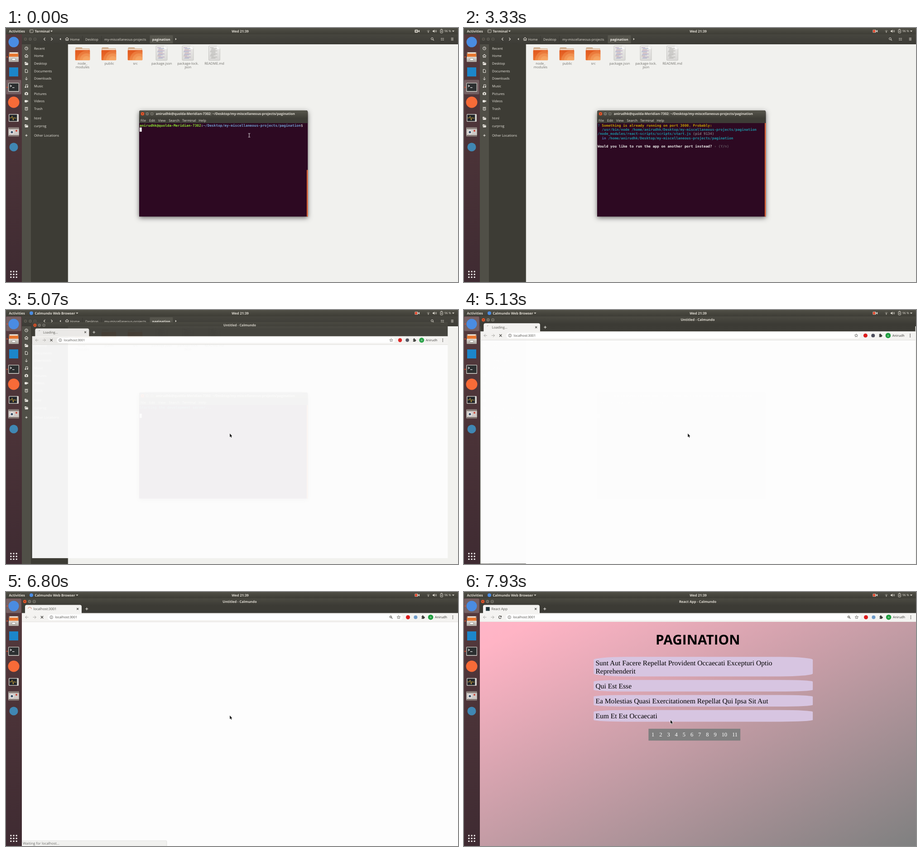
An HTML page with a canvas that plays this animation: 998x561 px, repeating every 8 s.

```html
<!DOCTYPE html>
<html lang="en">
<head>
<meta charset="utf-8">
<title>Pagination demo</title>
<style>
html, body { margin: 0; width: 100%; height: 100%; overflow: hidden; background: #f1f1ee; }
canvas { display: block; width: 998px; height: 561px; }
</style>
</head>
<body>
<canvas id="stage" width="998" height="561"></canvas>
<script>
const c = document.getElementById('stage').getContext('2d');
const LOOP = 8000, STEP = 1000 / 15, TAU = Math.PI * 2;
const SANS = '"Open Sans", "Noto Sans", sans-serif';
const SERIF = '"Liberation Serif", serif';
const MONO = '"DejaVu Sans Mono", monospace';
const USER = 'anirudhk', HOST = 'quolda-Meridian-7302', BROWSER = 'Calmundo';
const DIR = 'Desktop/my-miscellaneous-projects/pagination';
const LIGHT = '#dfdbd2';

// ---- drawing helpers ----
function rect(x, y, w, h, fill) { c.fillStyle = fill; c.fillRect(x, y, w, h); }
function box(x, y, w, h, r, fill, stroke, lw = 0.7) {
  c.beginPath(); c.roundRect(x, y, w, h, r);
  if (fill) { c.fillStyle = fill; c.fill(); }
  if (stroke) { c.strokeStyle = stroke; c.lineWidth = lw; c.stroke(); }
}
function disc(x, y, r, fill) { c.beginPath(); c.arc(x, y, r, 0, TAU); c.fillStyle = fill; c.fill(); }
function arc(x, y, r, a, b, color, lw = 1) {
  c.beginPath(); c.arc(x, y, r, a, b);
  c.strokeStyle = color; c.lineWidth = lw; c.stroke();
}
function trace(x, y, pts) {
  c.beginPath();
  for (let i = 0; i < pts.length; i += 2) c.lineTo(x + pts[i], y + pts[i + 1]);
}
function line(x, y, pts, color, lw = 1) { trace(x, y, pts); c.strokeStyle = color; c.lineWidth = lw; c.stroke(); }
function poly(x, y, pts, color) { trace(x, y, pts); c.closePath(); c.fillStyle = color; c.fill(); }
function fade(y0, y1, a, b) {
  const g = c.createLinearGradient(0, y0, 0, y1);
  g.addColorStop(0, a); g.addColorStop(1, b);
  return g;
}
// y is the middle of the capitals
function text(s, x, y, size, color, { bold, align = 'left', family = SANS } = {}) {
  c.font = `${bold ? 700 : 400} ${size}px ${family}`;
  c.textAlign = align; c.fillStyle = color;
  c.fillText(s, x, y + size * 0.357);
}
function cross(x, y, r, color, lw) {
  line(x, y, [-r, -r, r, r], color, lw);
  line(x, y, [-r, r, r, -r], color, lw);
}
function plus(x, y, r, color, lw) {
  line(x, y, [-r, 0, r, 0], color, lw);
  line(x, y, [0, -r, 0, r], color, lw);
}
function caret(x, y, color) { poly(x, y, [-2.6, -1.3, 2.6, -1.3, 0, 1.6], color); }
function lens(x, y, color) {
  arc(x - 0.6, y - 0.6, 2.3, 0, TAU, color, 1);
  line(x, y, [1, 1, 3.4, 3.4], color, 1.2);
}
function house(x, y, color) {
  line(x, y, [-4, 0.3, 0, -3.4, 4, 0.3], color, 1.1);
  line(x, y, [-2.7, 0, -2.7, 3.3, -0.8, 3.3, -0.8, 1, 0.8, 1, 0.8, 3.3, 2.7, 3.3, 2.7, 0], color, 1);
}
function winButtons(x, y, gap, active) {
  for (let i = 0; i < 3; i++) {
    const bx = x + gap * i;
    disc(bx, y, 4.3, '#33322d');
    disc(bx, y, 3.8, !active ? '#5a5951' : i ? '#77756b' : '#e9582c');
    if (i == 0) cross(bx, y, 1.4, '#3b2a22', 0.8);
    if (i == 1) line(bx, y, [-1.6, 0, 1.6, 0], '#33322d', 0.8);
    if (i == 2) box(bx - 1.4, y - 1.4, 2.8, 2.8, 0, null, '#33322d');
  }
}

// ---- shell ----
function topBar(t, web) {
  rect(0, 0, 998, 14, fade(0, 14, '#504f46', '#3e3d36'));
  text('Activities', 6.5, 7, 7.6, LIGHT, { bold: true });
  if (web) {
    disc(56, 7, 4, '#4a8ce2');
    text(BROWSER + ' Web Browser', 63.5, 7, 7.5, LIGHT, { bold: true });
    caret(157, 7, LIGHT);
  } else {
    box(52.5, 3.8, 7.5, 6.4, 1, null, LIGHT, 0.8);
    line(54, 5.4, [0, 0, 1.3, 1.2, 0, 2.4], LIGHT, 0.7);
    text('Terminal', 63.5, 7, 7.5, LIGHT, { bold: true });
    caret(100.5, 7, LIGHT);
  }
  text('Wed 21:39', 517, 7, 7.5, LIGHT, { bold: true, align: 'center' });
  box(902.5, 3.7, 7, 6.6, 1, LIGHT);
  poly(909.5, 7, [0, 0, 3.6, -2.8, 3.6, 2.8], LIGHT);
  if (t >= 70) box(903, 4.2, 5, 5.6, 1, '#e2492f');
  else disc(906, 7, 1.8, '#56554c');
  for (const r of [2.2, 4.3]) arc(932.5, 9.3, r, -2.4, -0.74, r > 3 ? '#8b897f' : LIGHT, 1);
  disc(932.5, 9.4, 0.9, LIGHT);
  poly(943, 7, [-1, -1.3, 1, -1.3, 3.2, -3.5, 3.2, 3.5, 1, 1.3, -1, 1.3], LIGHT);
  for (const r of [2, 3.8]) arc(946.5, 7, r, -0.8, 0.8, LIGHT, 0.9);
  box(959, 3.6, 5.4, 7.4, 1, null, LIGHT, 0.9);
  rect(960.4, 2.4, 2.6, 1.2, LIGHT);
  poly(961.7, 7.3, [0.8, -2.5, -1.5, 0.5, 0, 0.5, -0.8, 2.6, 1.5, -0.5, 0, -0.5], LIGHT);
  text('96 %', 968, 7, 6.6, LIGHT);
  caret(987.5, 7, LIGHT);
}
function dock(web) {
  rect(0, 14, 35, 547, fade(14, 561, '#553a3d', '#3f2b32'));
  box(0.5, web ? 14.5 : 114.5, 33, 32, 2, 'rgba(255,255,255,.2)');
  for (const y of web ? [31, 64, 131] : [64, 131]) disc(2.6, y, 1.3, '#e9582c');
  disc(17, 31, 11.5, '#4a8ce2');
  // file cabinet
  box(6, 53, 22, 22, 1.5, '#8b7464');
  rect(8, 54, 18, 5, '#f0eee9');
  rect(7, 56.5, 20, 8, '#e8762f');
  box(6, 63.5, 22, 11.5, 1, fade(63, 75, '#e2dfda', '#aaa59e'));
  box(13, 67, 8, 4.5, 1, '#f8f8f6', '#7d7872');
  box(7, 87, 20, 20, 0, '#1c86ca');
  // terminal
  box(5, 121, 24, 20, 1.5, '#c9c7c1');
  rect(6.3, 122.3, 21.4, 17, '#2c2f30');
  line(9, 126, [0, 0, 3, 2, 0, 4], '#fff', 1.2);
  rect(14, 131, 4.5, 1.2, '#fff');
  disc(17, 164, 12.5, '#f76b38');
  // system monitor
  box(6, 190, 22, 17, 1.5, '#d5d3ce');
  rect(7.3, 191.3, 17, 14.4, '#24272b');
  line(8, 198.5, [0, 0, 4, 0, 5.5, -4, 8, 5, 9.5, -1, 11, 0.5, 15, 0.5], '#dfb23c', 0.9);
  // screen recorder
  box(5, 219.5, 24, 20, 1, '#a8a19d');
  for (let x = 6.5; x < 28; x += 3) { rect(x, 220.5, 1.7, 1.8, '#57443f'); rect(x, 237, 1.7, 1.8, '#57443f'); }
  rect(6, 223.5, 22, 12.5, '#cfc9c6');
  disc(13, 230, 4.5, '#eeeceb'); disc(13, 230, 2.6, '#3d526a');
  disc(23, 227, 2, '#cc4436');
  disc(17, 263, 9.5, '#4087b3');
  for (let i = 0; i < 9; i++) disc(10.8 + (i % 3) * 6.2, 538 + (i / 3 | 0) * 6.2, 1.7, '#f4f1f0');
}

// ---- file manager ----
const sideIcons = {
  Recent(x, y, k) { arc(x, y, 3.3, 0, TAU, k, 1); line(x, y, [0, -2, 0, 0, 1.5, 0], k, 0.8); },
  Home: house,
  Documents(x, y, k) { line(x, y, [-2.6, -3.5, 1, -3.5, 2.7, -1.6, 2.7, 3.5, -2.6, 3.5, -2.6, -3.9], k, 1); },
  Downloads(x, y, k) { line(x, y, [0, -3.5, 0, 3], k, 1); line(x, y, [-2.8, 0.4, 0, 3.2, 2.8, 0.4], k, 1); },
  Music(x, y, k) { line(x, y, [-1.4, 2.4, -1.4, -3, 3, -3, 3, 1.6], k, 1); disc(-2 + x, y + 2.3, 1.5, k); disc(x + 2.3, y + 1.7, 1.5, k); },
  Pictures(x, y, k) { box(x - 3.7, y - 2.4, 7.4, 5.6, 1, k); rect(x - 1.4, y - 3.4, 2.8, 1.2, k); disc(x, y + 0.4, 1.5, '#504f47'); },
  Videos(x, y, k) { box(x - 3.8, y - 2.4, 5.4, 5, 0.8, k); poly(x, y, [1, 0, 3.8, -2.3, 3.8, 2.3], k); },
  Trash(x, y, k) { box(x - 2.8, y - 2, 5.6, 5.5, 1, null, k, 1); rect(x - 3.7, y - 3.6, 7.4, 1, k); line(x, y, [-0.8, -0.5, -0.8, 2.2], k, 0.7); line(x, y, [1, -0.5, 1, 2.2], k, 0.7); },
  'Other Locations'(x, y, k) { plus(x, y, 2.5, k, 1.1); }
};
function smallFolder(x, y, k) {
  poly(x, y, [-3.7, -3.2, -0.6, -3.2, 0.3, -2, 3.2, -2, 3.2, -1, -2.4, -1, -3.7, 3], k);
  poly(x, y, [-2, -0.3, 4.2, -0.3, 3.4, 3.4, -3.4, 3.4], k);
}
function bigFolder(cx) {
  box(cx - 15.5, 43, 15, 8, 1.5, '#c9a27f');
  box(cx - 15.5, 45, 31, 8, 1, '#d9b594');
  rect(cx - 14.5, 46.5, 29, 3, '#f6efe6');
  c.save();
  c.beginPath(); c.roundRect(cx - 16.3, 48.5, 32.6, 22.7, 1.5); c.clip();
  rect(cx - 17, 48, 34, 24, fade(48, 72, '#e0561c', '#ec7430'));
  for (const r of [21, 15, 9]) disc(cx + 9, 71, r, 'rgba(255,205,140,.24)');
  rect(cx - 17, 48.5, 34, 0.9, '#f4a06c');
  c.restore();
}
function docIcon(cx, inks) {
  box(cx - 12.5, 39.5, 25, 32, 1.5, fade(39, 72, '#ecebe9', '#d9d8d6'), '#bbbab7');
  for (let i = 0; i < 11; i++)
    rect(cx - 9.5 + i * 7 % 4, 43 + i * 2.3, 8 + i * 5 % 8, 0.9, inks[i % inks.length]);
  poly(cx + 12.5, 39.5, [-7, 0, 0, 7, -7, 7], '#fafaf9');
  poly(cx + 12.5, 39.2, [-6.6, 0, 0.4, 0, 0.4, 6.6], '#f1f1ee');
}
function files() {
  rect(35, 14, 963, 547, '#f1f1ee');
  rect(35, 14, 963, 22, fade(14, 36, '#47463f', '#3c3b35'));
  winButtons(43, 24.5, 10.5, false);
  line(85, 24.5, [1.5, -3, -1.5, 0, 1.5, 3], LIGHT, 1.1);
  line(101, 24.5, [-1.5, -3, 1.5, 0, -1.5, 3], LIGHT, 1.1);
  poly(120, 24.5, [1.2, -2.5, 1.2, 2.5, -1.6, 0], LIGHT);
  house(134.8, 24.3, LIGHT);
  box(317.5, 16, 51, 18, 1, '#55544c');
  for (const x of [168.5, 210.5]) rect(x, 17, 0.7, 16, '#37362f');
  text('Home', 141.5, 25, 7.45, LIGHT);
  text('Desktop', 175, 25, 7.45, LIGHT);
  text('my-miscellaneous-projects', 217, 25, 7.45, LIGHT);
  text('pagination', 342.7, 25, 7.4, '#f2efe8', { bold: true, align: 'center' });
  poly(375, 24.5, [-1.2, -2.5, -1.2, 2.5, 1.6, 0], LIGHT);
  lens(941.5, 24.3, LIGHT);
  for (const y of [22.8, 26.2]) { rect(960.5, y - 0.6, 1.8, 1.6, LIGHT); rect(963.2, y - 0.3, 3.8, 1, LIGHT); }
  for (const y of [22, 24.4, 26.8]) rect(982.7, y - 0.4, 5.2, 1, LIGHT);

  rect(35, 36, 102, 525, '#3d3c35');
  rect(35, 36, 20, 525, '#504f47');
  rect(136.3, 36, 0.8, 525, '#6f6e67');
  const names = ['Recent', 'Home', 'Desktop', 'Documents', 'Downloads', 'Music', 'Pictures', 'Videos', 'Trash', 'html', 'curprog', 'Other Locations'];
  names.forEach((s, i) => {
    const y = 45 + 16.65 * i + (i > 8 ? 4.6 : 0) + (i > 10 ? 4.6 : 0);
    (sideIcons[s] || smallFolder)(45, y, '#f0ede6');
    text(s, 62, y, 7.4, '#eae7df');
  });

  for (const x of [169, 227, 285]) bigFolder(x);
  const code = ['#a58ab5', '#8f9cc4', '#c39a9a'];
  docIcon(343.5, code); docIcon(401.5, code); docIcon(460, ['#a9a8a5']);
  const label = (s, x, y = 78) => text(s, x, y, 7.5, '#73726d', { align: 'center' });
  label('node_', 169); label('modules', 169, 86.7);
  label('public', 228); label('src', 285.5);
  label('package.json', 343.7);
  label('package-lock.', 401.7); label('json', 401.7, 86.7);
  label('README.md', 460);
}

// ---- terminal ----
const CELL = 4.68, ROW = 9.35, COLS = 78;
const WHITE = '#eeeeec', CYAN = '#1b93a4', GREEN = '#8ae234', BLUE = '#729fcf';
// parts: [string, color, bold]...; long lines wrap
function print(row, ...parts) {
  let n = 0;
  for (const [s, color, bold] of parts) {
    for (const ch of s) {
      const x = 295 + n % COLS * CELL, y = 214.9 + (row + (n / COLS | 0)) * ROW;
      text(ch, x, y, 7.77, color, { bold, family: MONO });
      n++;
    }
  }
}
function block(row, col) { rect(295 + col * CELL, 210.3 + row * ROW, CELL, ROW, '#fff'); }
function shellText(t) {
  if (t < 3200) {
    print(0, [`${USER}@${HOST}`, GREEN, true], [':', WHITE, true], ['~/' + DIR, BLUE, true], ['$', WHITE]);
    if (t >= 1070) print(1, ['npm start', WHITE]);
    if (t >= 2270) {
      print(3, [`> pagination@0.1.0 start /home/${USER}/${DIR}`, WHITE]);
      print(5, ['> react-scripts start', WHITE]);
    }
    if (t < 1070) { if (t < 270 || t >= 870) block(1, 0); }
    else if (t < 2070) { if (t < 1730) block(1, 9); }
    else if (t < 2270) block(2, 0);
    else if (t < 2670) block(7, 0);
  } else if (t < 3330) {
    block(0, 0);
  } else if (t < 4800) {
    const done = t >= 4530;
    print(0, done ? ['✔', '#4e9a06'] : ['?', CYAN], [' Something is already running on port 3000. Probably:', '#c4a000', true]);
    print(1, [`  /usr/bin/node /home/${USER}/${DIR}`, CYAN, true]);
    print(2, ['/node_modules/react-scripts/scripts/start.js', CYAN, true], [' (pid 9134)', '#77767b', true]);
    print(3, ['  in ', '#4a74b0', true], [`/home/${USER}/${DIR}`, CYAN, true]);
    print(5, ['Would you like to run the app on another port instead?', WHITE, true], done ? [' … ', '#77767b'] : [' › ', '#77767b'], done ? ['yes', WHITE] : ['(Y/n)', '#77767b']);
  } else {
    print(0, ['Starting the development server...', CYAN]);
    block(2, 0);
  }
}
function terminal(t) {
  c.save();
  c.shadowColor = 'rgba(0,0,0,.55)'; c.shadowBlur = 11; c.shadowOffsetY = 3;
  box(294, 182, 372.3, 234.6, [4, 4, 0, 0], '#2d0922');
  c.restore();
  box(294, 182, 372.3, 16, [4, 4, 0, 0], fade(182, 198, '#57564d', '#403f38'));
  rect(294, 198, 372.3, 12, '#3d3c36');
  winButtons(301.5, 189.5, 10.4, true);
  text(`${USER}@${HOST}: ~/${DIR}`, 330.7, 189.7, 7.4, LIGHT, { bold: true });
  const menu = { File: 297, Edit: 316, View: 336, Search: 359.5, Terminal: 389, Help: 425.5 };
  for (const s in menu) text(s, menu[s], 204, 7.5, LIGHT);
  const top = t < 3200 ? 313.5 : 210;
  rect(664, top, 2.3, 416.6 - top, '#e5622f');
  shellText(t);
}

// ---- browser ----
function spinner(t) {
  if (t < 5270) {
    const a = -2.5 - (t - 5130) / 1320 * TAU;
    arc(52.5, 37.3, 3.7, a, a + 0.8, '#8b8a86', 0.9);
  } else {
    const a = -2.95 + (t - 6800) / 1568 * TAU;
    const sweep = Math.PI * (0.94 + 0.5 * Math.sin((t - 6800) / 1333 * TAU));
    arc(52.5, 37.3, 3.7, a, a + sweep, '#cf6a50', 0.9);
  }
}
function page() {
  const w = 963, h = 495, k = w * h / (w * w + h * h);
  const g = c.createLinearGradient(516.5 - h * k, 313.5 - w * k, 516.5 + h * k, 313.5 + w * k);
  g.addColorStop(0, '#ffb6c8'); g.addColorStop(0.06, '#ffb4c5'); g.addColorStop(1, '#7f8080');
  rect(35, 66, w, h, g);
  text('PAGINATION', 516.3, 105.3, 29.8, '#000', { bold: true, align: 'center' });
  for (const [y, ch] of [[143.3, 43.2], [194.2, 25.6], [227.4, 25.6], [260.8, 25.6]]) {
    c.beginPath();
    c.roundRect(286.3, y, 483.8, ch, { x: 483.8 * 0.15, y: ch * 0.15 });
    c.fillStyle = '#d7c5e1'; c.fill();
  }
  const serif = { family: SERIF };
  text('Sunt Aut Facere Repellat Provident Occaecati Excepturi Optio', 290.4, 156.4, 15.6, '#000', serif);
  text('Reprehenderit', 290.4, 174, 15.6, '#000', serif);
  text('Qui Est Esse', 290.4, 207.2, 15.6, '#000', serif);
  text('Ea Molestias Quasi Exercitationem Repellat Qui Ipsa Sit Aut', 290.4, 240.4, 15.6, '#000', serif);
  text('Eum Et Est Occaecati', 290.4, 273.6, 15.6, '#000', serif);
  rect(407.4, 302, 202.8, 26.2, '#7f7f7f');
  for (let i = 1; i < 12; i++)
    text(i, 414.1 + (i - 1) * 17.17 + (i > 10 ? 6.24 : 0), 315, 12.48, '#fff', serif);
}
function star(x, y, r) {
  const p = [];
  for (let i = 0; i <= 10; i++) {
    const a = i * Math.PI / 5 - Math.PI / 2, q = i % 2 ? r * 0.45 : r;
    p.push(Math.cos(a) * q, Math.sin(a) * q);
  }
  line(x, y, p, '#55544f', 0.8);
}
function status(t) {
  const alpha = t < 6870 ? Math.min(1, (t - 5930) / 200) : Math.min(1, (7330 - t) / 400);
  if (alpha <= 0) return;
  c.save();
  c.globalAlpha = alpha;
  const loaded = t >= 6870;
  box(34.5, 549.2, loaded ? 319.8 : 320.4, 13, [0, 2, 0, 0], loaded ? '#f5f4f3' : '#f1f1ef', loaded ? null : '#d9d9d6');
  text('Waiting for localhost…', 37.3, 555.3, 7.8, '#6b6b69');
  c.restore();
}
function browser(t) {
  const grow = 1 - 2 ** (-10 * Math.min(1, (t - 5005) / 150));
  const loaded = t >= 6870, dark = '#3f3e3a';
  c.save();
  if (t < 5190) {
    const s = 0.05 + 0.95 * grow;
    c.globalAlpha = grow;
    c.translate(516.5, 287.5); c.scale(s, s); c.translate(-516.5, -287.5);
  }
  rect(35, 14, 963, 33, fade(14, 30, '#4b4a42', '#3c3b35'));
  winButtons(41.5, 21, 10.4, true);
  text((loaded ? 'React App - ' : 'Untitled - ') + BROWSER, 516, 21, 7.5, LIGHT, { bold: true, align: 'center' });
  box(42, 28.5, 125, 20, [4, 4, 0, 0], '#f4f3f1');
  rect(35, 46.5, 963, 20, '#f4f3f1');
  rect(35, 66, 963, 495, '#fdfdfd');
  rect(35, 65.6, 963, 0.7, '#d6d5d2');
  text(loaded ? 'React App' : t < 5270 ? 'Loading…' : 'localhost:3001', 60.5, 37.3, 7.6, '#55544f');
  if (!loaded) spinner(t);
  else if (t < 7000) disc(52.5, 37.3, 3.8, '#27464d');
  else rect(48.3, 33.2, 8.4, 8.4, '#1f3238');
  cross(158.2, 37.3, 2, '#3f3e3a', 1.1);
  plus(178.3, 37.3, 3, '#eceae5', 1.1);

  for (const [x, d] of [[46, 1], [63, -1]]) {
    line(x, 55.7, [-3.5 * d, 0, 3.5 * d, 0], '#a9a8a4', 1);
    line(x, 55.7, [0, -3.3, -3.3 * d, 0, 0, 3.3], '#a9a8a4', 1);
  }
  if (loaded) {
    arc(79.5, 55.7, 2.9, 0.5, 5.6, dark, 1.1);
    poly(79.5, 55.7, [3.5, -3.6, 3.5, -0.2, 0.2, -0.2], dark);
  } else cross(79.5, 55.7, 2.7, dark, 1.2);
  box(92, 49.5, 784, 12.6, 6.3, '#fff');
  arc(100.2, 55.7, 3.3, 0, TAU, '#5a5955', 0.8);
  line(100.2, 55.7, [0, -0.5, 0, 1.9], '#5a5955', 0.9);
  disc(100.2, 54, 0.6, '#5a5955');
  text('localhost:3001', 108.4, 55.6, 7.25, '#4a4945');
  if (t >= 6000) { lens(850, 55.5, '#55544f'); plus(849.4, 54.9, 1.2, '#55544f', 0.6); }
  star(867, 55.8, 3.8);
  disc(887.5, 55.7, 4.5, '#dc1b1b');
  disc(904.4, 55.7, 4, t < 5470 ? '#4b4c5a' : '#6f9cc9');
  box(917.6, 53.4, 5.6, 5.8, 0.8, dark);
  disc(920.2, 53, 1.5, dark); disc(923.4, 56.2, 1.5, dark); disc(917.7, 56.4, 1, '#f4f3f1');
  disc(937.6, 55.7, 5.8, '#1f9d3f');
  text('A', 937.6, 55.7, 6, '#e8f6ea', { align: 'center' });
  text('Anirudh', 947, 55.6, 7.2, '#33322f');
  for (const y of [52.8, 55.8, 58.8]) disc(986.5, y, 0.9, dark);

  if (loaded) page();
  status(t);
  c.restore();
}

// ---- pointer ----
function arrow(x, y) {
  trace(x, y, [0, 0, 0, 7.6, 1.8, 6, 3, 8.7, 4.2, 8.2, 3, 5.6, 5.2, 5.4]);
  c.closePath();
  c.lineWidth = 1.3; c.strokeStyle = '#f2f2f2'; c.stroke();
  c.fillStyle = '#111'; c.fill();
}
function beam(x, y) {
  line(x, y, [0, -3.5, 0, 3.5], '#e6e2e5', 1);
  for (const s of [-4, 4]) line(x, y, [-2.3, s, 2.3, s], '#e6e2e5', 0.9);
}
function pointer(t) {
  if (t < 1070) {
    const p = Math.min(1, t / 267), e = p * p * (3 - 2 * p);
    beam(537 - 43 * e, 237 + 36.5 * e);
  } else if (t >= 7800) {
    const q = Math.min(1, (t - 7800) / 130);
    arrow(483 - 27 * q, 264.5 + 18.5 * q ** 1.2);
  } else if (t >= 4730) arrow(494.2, 273);
}

function draw(t) {
  const web = t >= 5070;
  c.clearRect(0, 0, 998, 561);
  c.textRendering = 'geometricPrecision';
  if (t < 5190) { files(); terminal(t); }
  if (web) browser(t);
  dock(web);
  topBar(t, web);
  pointer(t);
}

let last = -1;
const begin = performance.now();
function tick() {
  const now = (performance.now() - begin) % LOOP;
  const k = Math.floor((now + 4) / STEP) % 120;
  if (k !== last) { last = k; draw(Math.round(k * STEP / 10) * 10); }
  requestAnimationFrame(tick);
}
tick();
</script>
</body>
</html>
```
